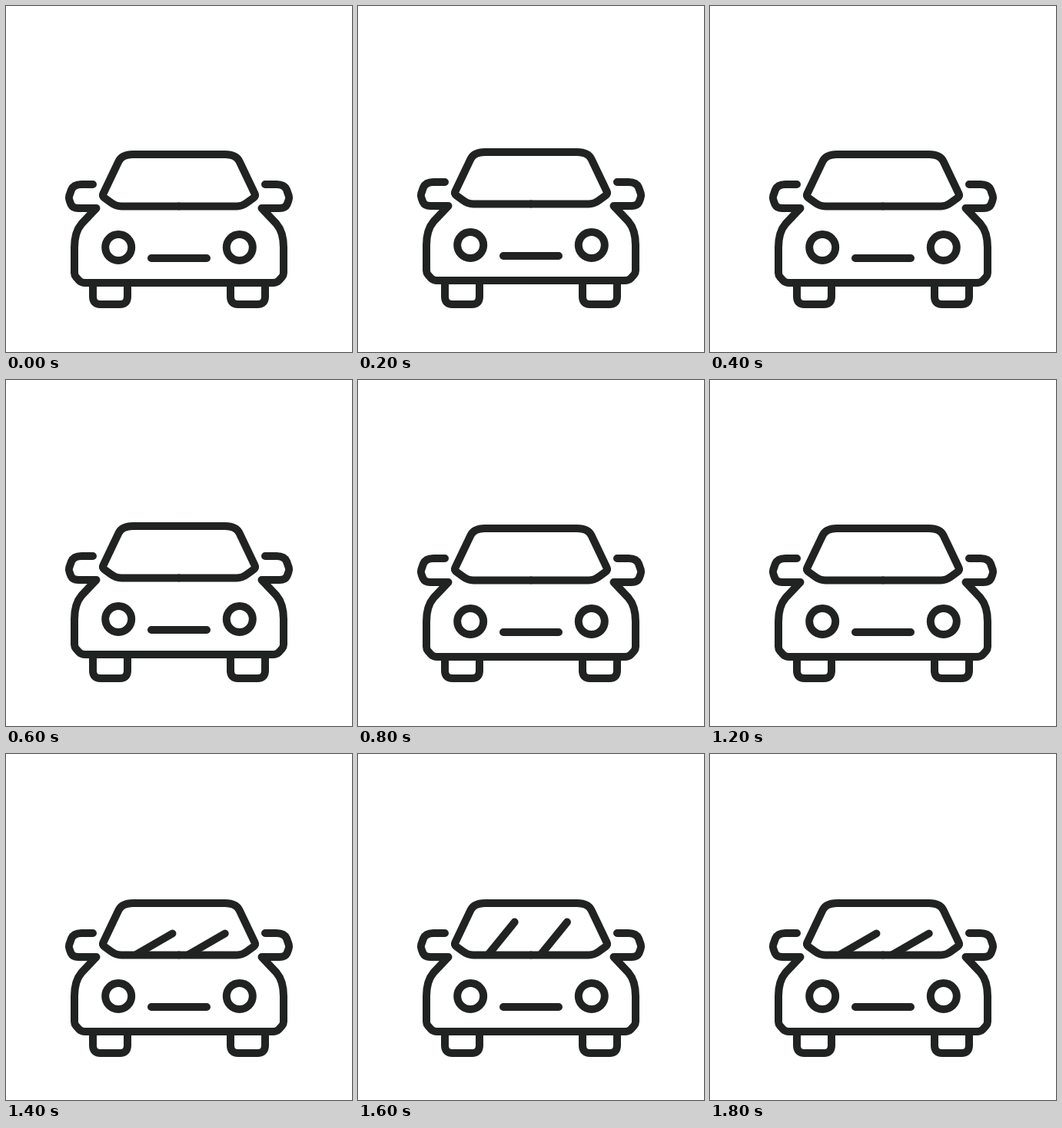
An HTML page with a canvas that plays this animation: 450 px wide and 450 px high, repeating every 2000 ms.

```html
<!DOCTYPE html>
<html lang="en">
<head>
<meta charset="utf-8">
<title>Car</title>
<style>
html, body { margin: 0; width: 100%; height: 100%; overflow: hidden; background: #fff; }
canvas { display: block; }
</style>
</head>
<body>
<canvas id="stage" width="450" height="450"></canvas>
<script>
const ctx = document.getElementById('stage').getContext('2d');
const STEP = 200;
const WIPER_LENGTH = 54;

// One pose per step: body and wheel offsets, wiper angle in degrees (null = hidden)
const rest = { body: 0, wheels: 0, wiper: null };
const hop = { body: -3, wheels: 0, wiper: null };
const wiperLow = { body: 1, wheels: 1, wiper: 30 };
const wiperHigh = { body: 1, wheels: 1, wiper: 51 };
const poses = [rest, hop, rest, hop, rest, hop, rest, wiperLow, wiperHigh, wiperLow];

// Left half of the car; the right half is its reflection about x = 225
const halfBody = new Path2D(
  'M225 193 H165 Q151 193 146.5 202 L126.5 244 Q125 247 128 249.5 L137 256 Q143 260.5 150 260.5 H225' +
  'M113 232 H98 Q88 232 85 239 L82.2 247 Q81.3 250 82.6 253 L84.5 258 Q87 263 94 263 H117.5' +
  'L98.5 283 Q89 294 89 314 V347 Q89 350 91 352.5 L95 357 Q98 360 103 360 H225' +
  'M225 328 H189');
const halfWheels = new Path2D('M113 359 V378 Q113 388 123 388 H148 Q158 388 158 378 V359');
const headlight = new Path2D();
headlight.arc(146.2, 314, 17, 0, Math.PI * 2);

function mirrored(y, cap, ...paths) {
  ctx.lineCap = cap;
  for (const side of [1, -1]) {
    ctx.save();
    ctx.translate(side > 0 ? 0 : 450, y);
    ctx.scale(side, 1);
    paths.forEach(path => ctx.stroke(path));
    ctx.restore();
  }
}

function drawWiper(x, y, degrees) {
  const angle = degrees * Math.PI / 180;
  ctx.lineCap = 'round';
  ctx.beginPath();
  ctx.moveTo(x, y);
  ctx.lineTo(x + WIPER_LENGTH * Math.cos(angle), y - WIPER_LENGTH * Math.sin(angle));
  ctx.stroke();
}

function draw(now) {
  const pose = poses[Math.floor(now / STEP) % poses.length];
  ctx.fillStyle = '#fff';
  ctx.fillRect(0, 0, 450, 450);
  ctx.strokeStyle = '#212222';
  ctx.lineWidth = 10;
  ctx.lineJoin = 'round';
  mirrored(pose.wheels, 'butt', halfWheels);
  mirrored(pose.body, 'round', halfBody, headlight);
  if (pose.wiper !== null) {
    for (const x of [169.7, 238]) drawWiper(x, 259.5 + pose.body, pose.wiper);
  }
}

const start = performance.now();
function frame() {
  draw(performance.now() - start);
  requestAnimationFrame(frame);
}
frame();
</script>
</body>
</html>
```
